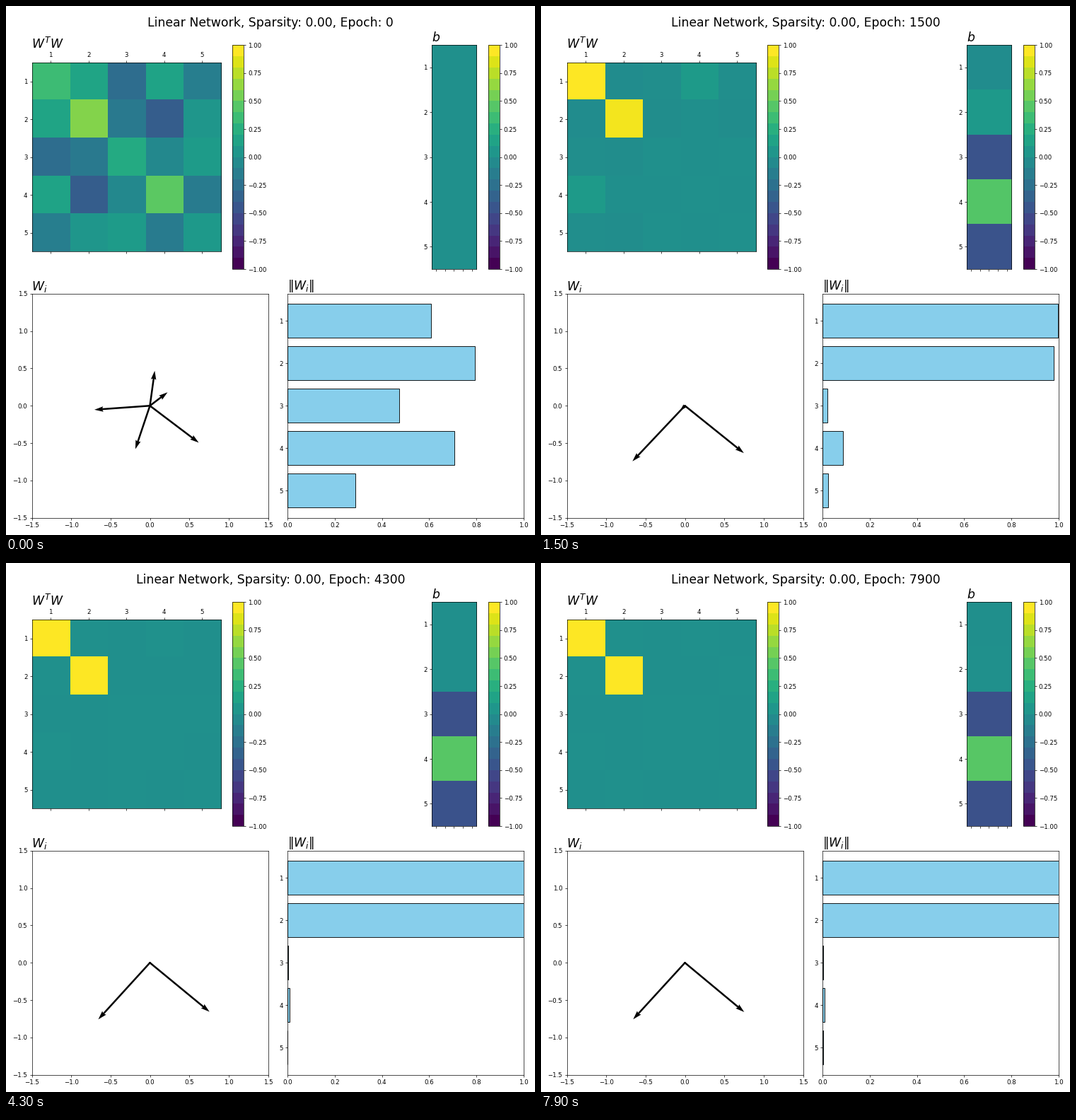
Animation, 748 px wide and 748 px high, one loop 8 s. Source, as a matplotlib script:

```python
import numpy as np
import matplotlib.pyplot as plt
from matplotlib.animation import FuncAnimation
from matplotlib.cm import ScalarMappable
from matplotlib.colors import Normalize

SIZE, FRAMES, STEP_MS = 748, 80, 100
NAMES = [1, 2, 3, 4, 5]

# Training state at a few moments (unit: 100 epochs)
KEYS = np.array([0, 9, 15, 27])
WEIGHTS = np.array([
    [(-.185, -.580), (.620, -.494), (.061, .468), (-.705, -.053), (.224, .180)],
    [(-.618, -.716), (.751, -.614), (-.010, .084), (-.255, -.158), (-.008, .060)],
    [(-.667, -.743), (.748, -.633), (-.003, .022), (-.059, -.065), (-.003, .024)],
    [(-.658, -.756), (.755, -.659), (.000, .001), (-.005, -.004), (.001, .000)],
])
BIASES = np.array([
    [0, 0, 0, 0, 0],
    [-.06, .13, -.46, .32, -.46],
    [-.03, .08, -.49, .46, -.49],
    [0, 0, -.50, .48, -.50],
])


def smooth_track(keys, vals):
    """Monotone cubic through vals, sampled once per frame and held at the end."""
    vals = vals.reshape(len(keys), -1)
    h = np.diff(keys)[:, None].astype(float)
    d = np.diff(vals, axis=0) / h
    slope = np.zeros_like(vals)
    slope[0] = ((2 * h[0] + h[1]) * d[0] - h[0] * d[1]) / (h[0] + h[1])
    same = d[:-1] * d[1:] > 0
    total = np.where(same, d[:-1] + d[1:], 1)
    slope[1:-1] = np.where(same, 2 * d[:-1] * d[1:] / total, 0)
    t = np.minimum(np.arange(FRAMES), keys[-1])
    i = np.minimum(np.searchsorted(keys, t, side="right") - 1, len(keys) - 2)
    w = h[i]
    u = (t - keys[i])[:, None] / w
    return (vals[i] * (1 + 2 * u) * (1 - u) ** 2 + vals[i + 1] * u * u * (3 - 2 * u)
            + w * slope[i] * u * (1 - u) ** 2 + w * slope[i + 1] * u * u * (u - 1))


# Small batch noise that remains after convergence
rng = np.random.default_rng(4)
ramp = np.minimum(np.arange(FRAMES) / KEYS[-1], 1)
spread = np.array([.0013, .0013, .002, .003, .002])[:, None]
W = smooth_track(KEYS, WEIGHTS).reshape(FRAMES, 5, 2)
W = W + rng.normal(size=W.shape) * spread * ramp[:, None, None]
B = smooth_track(KEYS, BIASES)
B = B + rng.normal(size=B.shape) * .002 * ramp[:, None]

fig = plt.figure(figsize=(12, 12), dpi=SIZE / 12, facecolor="white")


def panel(x, y, w, h, title=None):
    """Axes placed in pixels from the top left corner."""
    ax = fig.add_axes([x / SIZE, 1 - (y + h) / SIZE, w / SIZE, h / SIZE])
    if title:
        ax.set_title(title, loc="left", fontsize=20)
    return ax


def heatmap(ax, data):
    im = ax.imshow(data, cmap="viridis", vmin=-1, vmax=1, aspect="auto",
                   interpolation="nearest")
    ax.set_yticks(range(5), NAMES)
    return im


def colorbar(x):
    bands = ScalarMappable(Normalize(-1, 1), plt.get_cmap("viridis", 20))
    fig.colorbar(bands, cax=panel(x, TOP, H / 20, H), ticks=np.linspace(-1, 1, 9))


LEFT, RIGHT, TOP, LOW = 36.5, 397.9, 55.2, 406.8
WIDE, H = 334, 316.9
SIDE = .8 * WIDE

gram_ax = panel(LEFT, TOP + (H - SIDE) / 2, SIDE, SIDE, "$W^TW$")
gram = heatmap(gram_ax, np.zeros((5, 5)))
gram_ax.set_xticks(range(5), NAMES)
gram_ax.tick_params(axis="x", top=True, bottom=True, labeltop=True, labelbottom=False)
colorbar(LEFT + .85 * WIDE)

bias_ax = panel(RIGHT + SIDE - H / 5, TOP, H / 5, H, "$b$")
bias = heatmap(bias_ax, np.zeros((5, 1)))
bias_ax.set_xticks(np.linspace(-.4, .4, 5), [""] * 5)
colorbar(RIGHT + .85 * WIDE)

vec_ax = panel(LEFT, LOW, WIDE, H, "$W_i$")
vec_ax.set(xlim=(-1.5, 1.5), ylim=(-1.5, 1.5),
           xticks=np.linspace(-1.5, 1.5, 7), yticks=np.linspace(-1.5, 1.5, 7))
zero = np.zeros(5)
arrows = vec_ax.quiver(zero, zero, W[0, :, 0], W[0, :, 1], angles="xy",
                       scale_units="xy", scale=1, color="black")

norm_ax = panel(RIGHT, LOW, WIDE, H, r"$\|W_i\|$")
bars = norm_ax.barh(range(5), zero, color="skyblue", edgecolor="black")
norm_ax.set(xlim=(0, 1), ylim=(4.64, -.64), xticks=np.linspace(0, 1, 6))
norm_ax.set_yticks(range(5), NAMES)

heading = fig.suptitle("", fontsize=20)


def update(n):
    w = W[n]
    heading.set_text(f"Linear Network, Sparsity: 0.00, Epoch: {n * 100}")
    gram.set_data(w @ w.T)
    bias.set_data(B[n][:, None])
    arrows.set_UVC(w[:, 0], w[:, 1])
    for bar, length in zip(bars, np.hypot(w[:, 0], w[:, 1])):
        bar.set_width(length)
    return heading, gram, bias, arrows, *bars


anim = FuncAnimation(fig, update, frames=FRAMES, interval=STEP_MS,
                     init_func=lambda: update(0), repeat=True, repeat_delay=0)
plt.show()
```
